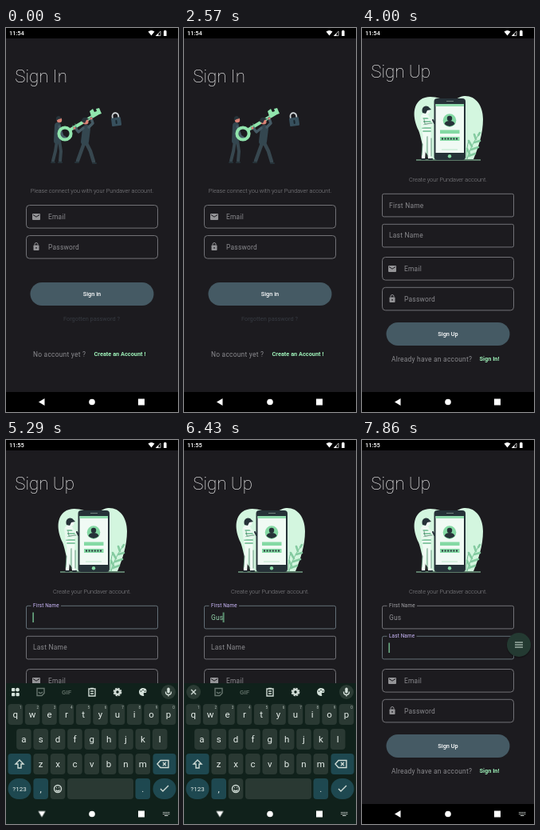
Animation, 216 px wide and 480 px high, one loop 8000 ms. Source, as an HTML page:

```html
<!DOCTYPE html>
<html lang="en">
<head>
<meta charset="utf-8">
<title>Sign up flow</title>
<style>
html, body { margin: 0; width: 100%; height: 100%; overflow: hidden; background: #000; }
svg { display: block; width: 216px; height: 480px; font-family: Roboto, sans-serif; }

.title { font-size: 22.3px; font-weight: 100; fill: #fff; }
.caption { font-size: 7.3px; font-weight: 300; fill: #88888c; text-anchor: middle; }
.body { font-size: 8.4px; letter-spacing: .26px; fill: #8a8a8e; }
.action { font-size: 7.36px; font-weight: 500; fill: #fff; text-anchor: middle; }
.link { font-size: 7.36px; font-weight: 700; fill: #9df0b8; }
.outline { fill: none; stroke: #7c7c80; stroke-width: .9; }
.icon { fill: #949497; }
.line { fill: none; stroke: #d0dbd5; stroke-width: 1.4; }
.key { font-size: 11.5px; fill: #e4ece8; text-anchor: middle; }
.hint { font-size: 4.5px; fill: #b4c0ba; text-anchor: middle; }

/* One percent of the loop is 80 ms. */
.anim { animation: 8s infinite linear; }
.step { animation: 8s infinite step-end; }

#signUp { animation-name: slideIn, fadeIn; }
@keyframes slideIn {
  0%, 32% { transform: translateX(50px); animation-timing-function: cubic-bezier(.3,0,.8,.15); }
  32.94% { transform: translateX(30px); animation-timing-function: cubic-bezier(.05,.7,.1,1); }
  37.6%, 100% { transform: none; }
}
@keyframes fadeIn { 0%, 32.5% { opacity: 0; } 33.6%, 100% { opacity: 1; } }

#early { animation-name: early; }
#late { animation-name: late; }
@keyframes early { 0% { opacity: 1; } 53.5%, 100% { opacity: 0; } }
@keyframes late { 0% { opacity: 0; } 53.5%, 100% { opacity: 1; } }

#firstLabel { transform-origin: 34px 224.5px; animation-name: floatFirst, tintFirst; }
#lastLabel { transform-origin: 34px 262.2px; animation-name: floatLast, tintLast; }
@keyframes floatFirst { 0%, 61.2% { transform: none; } 63.1%, 100% { transform: translateY(-15.5px) scale(.75); } }
@keyframes floatLast { 0%, 92.9% { transform: none; } 94.8%, 100% { transform: translateY(-15.5px) scale(.75); } }
@keyframes tintFirst { 0%, 61.2% { fill: #8a8a8e; } 63.1%, 92.9% { fill: #cfbcff; } 94.8%, 100% { fill: #a5a5a9; } }
@keyframes tintLast { 0%, 92.9% { fill: #8a8a8e; } 94.8%, 100% { fill: #cfbcff; } }
#firstGap { animation-name: gapFirst; }
#lastGap { animation-name: gapLast; }
@keyframes gapFirst { 0%, 61.2% { opacity: 0; } 62.7%, 100% { opacity: 1; } }
@keyframes gapLast { 0%, 92.9% { opacity: 0; } 94.4%, 100% { opacity: 1; } }
#firstBox { animation-name: ringFirst; }
#lastBox { animation-name: ringLast; }
@keyframes ringFirst { 0%, 61.2% { stroke: #7c7c80; } 63.1%, 92.9% { stroke: #6d7a82; } 94.8%, 100% { stroke: #7c7c80; } }
@keyframes ringLast { 0%, 92.9% { stroke: #7c7c80; } 94.8%, 100% { stroke: #6d7a82; } }

#char0 { animation-name: char0; }
#char1 { animation-name: char1; }
#char2 { animation-name: char2; }
@keyframes char0 { 0% { fill-opacity: 0; } 75%, 100% { fill-opacity: 1; } }
@keyframes char1 { 0% { fill-opacity: 0; } 77.5%, 100% { fill-opacity: 1; } }
@keyframes char2 { 0% { fill-opacity: 0; } 80.3%, 100% { fill-opacity: 1; } }
#typed { animation-name: typedTint; }
@keyframes typedTint { 0% { fill: #91cfa9; } 92.9%, 100% { fill: #8e8e92; } }

#firstCaret { animation-name: blinkFirst, caretMove; }
#lastCaret { animation-name: blinkLast; }
@keyframes blinkFirst {
  0% { opacity: 0; } 61.2% { opacity: 1; } 67.5% { opacity: 0; }
  73.8% { opacity: 1; } 86.5%, 100% { opacity: 0; }
}
@keyframes caretMove {
  0% { transform: none; } 75% { transform: translateX(6px); }
  77.5% { transform: translateX(11px); } 80.3%, 100% { transform: translateX(15.5px); }
}
@keyframes blinkLast { 0% { opacity: 0; } 92.9%, 100% { opacity: 1; } }

#keyboard { animation-name: keyboard; }
@keyframes keyboard {
  0%, 62.5% { transform: translateY(151px); animation-timing-function: cubic-bezier(0,0,.2,1); }
  65.5%, 81.7% { transform: none; animation-timing-function: cubic-bezier(.4,0,1,1); }
  84.3%, 100% { transform: translateY(151px); }
}
#menuIcon { animation-name: menu; }
#closeIcon { animation-name: close; }
@keyframes menu { 0% { opacity: 1; } 75%, 100% { opacity: 0; } }
@keyframes close { 0% { opacity: 0; } 75%, 100% { opacity: 1; } }

#navBar { animation-name: navTint; }
@keyframes navTint { 0% { fill: #000; } 62.5% { fill: #10211b; } 84.5%, 100% { fill: #000; } }
#back { transform-origin: 45px 467.5px; animation-name: turn; }
@keyframes turn { 0%, 62.5% { transform: none; } 64.4%, 81.7% { transform: rotate(-90deg); } 83.5%, 100% { transform: none; } }
#imeSwitch { animation-name: imeSwitch; }
@keyframes imeSwitch { 0% { opacity: 0; } 62.5%, 100% { opacity: 1; } }
#fab { transform-origin: 197px 256px; animation-name: pop; }
@keyframes pop {
  0%, 94.6% { opacity: 0; transform: scale(.6); }
  96.4%, 100% { opacity: 1; transform: none; }
}
</style>
</head>
<body>
<svg viewBox="0 0 216 480">
  <defs>
    <g id="mail" class="icon"><rect x="-5" y="-4" width="10" height="8" rx="1"/><path d="M-4-2.5 0 .2 4-2.5" fill="none" stroke="#1c1b1f"/></g>
    <g id="lock" class="icon"><rect x="-3.5" y="-2" width="7" height="6.5" rx=".8"/><path d="M-2-2v-1a2 2 0 0 1 4 0v1" fill="none" stroke="#949497"/><circle cy="1.3" r=".9" fill="#1c1b1f"/></g>
  </defs>

  <rect width="216" height="480" fill="#1c1b1f"/>

  <g id="signIn">
    <text class="title" x="11.3" y="68.3">Sign In</text>

    <g id="carriers" stroke-linecap="round" stroke-linejoin="round" fill="none">
      <path d="M64 141 62 154 59 166M67 141l2 13-1 12" stroke="#37474f" stroke-width="4"/>
      <path d="M57 168h4M66 168h4" stroke="#263238" stroke-width="2"/>
      <path d="M65 122 64 141" stroke="#344750" stroke-width="8"/>
      <path d="M67 123 71 135 76 138" stroke="#455a64" stroke-width="3"/>
      <circle cx="67" cy="115" r="3.2" fill="#d98275"/>
      <path d="M63 116q-1-7 4-6l3 3-4 1z" fill="#263238"/>
      <path d="M98 144 94 155 90 166M101 144l5 10 4 13" stroke="#37474f" stroke-width="4.5"/>
      <path d="M87 168h4M109 169h4" stroke="#263238" stroke-width="2"/>
      <circle cx="74" cy="132" r="7.6" stroke="#91e5ad" stroke-width="4"/>
      <path d="M81 127 118 105" stroke="#91e5ad" stroke-width="4" stroke-linecap="butt"/>
      <path d="M107 110l-2-6 4-3 2 4 3-1-1-3 4-1 3 7z" fill="#91e5ad"/>
      <path d="M84 122l1 5M87 120l2 5" stroke="#67bd8b"/>
      <path d="M101 126 99 142" stroke="#344750" stroke-width="10"/>
      <path d="M97 125 91 130 87 125M104 124l5-5-2-6" stroke="#455a64" stroke-width="3.5"/>
      <circle cx="100" cy="117" r="3.6" fill="#d98275"/>
      <path d="M95 117q0-6 6-5l4 2-4 1-2 4z" fill="#263238"/>
      <circle cx="86" cy="125" r="1.5" fill="#d98275"/>
      <circle cx="107" cy="113" r="1.5" fill="#d98275"/>
      <g transform="rotate(-8 138 117)">
        <path d="M134.5 112v-2a3.8 3.8 0 0 1 7.6 0v2" stroke="#d0d5d8" stroke-width="1.8"/>
        <rect x="132.5" y="112" width="12" height="10.5" rx="1" fill="#37505d"/>
        <path d="M138.5 116v3" stroke="#18242b" stroke-width="2"/>
      </g>
    </g>

    <text class="caption" x="108" y="206.3">Please connect you with your Pundaver account.</text>
    <rect class="outline" x="25.5" y="221.5" width="165" height="28.6" rx="4"/>
    <use href="#mail" x="38" y="236"/><text class="body" x="53" y="239">Email</text>
    <rect class="outline" x="25.5" y="259.5" width="165" height="28.6" rx="4"/>
    <use href="#lock" x="38" y="273.5"/><text class="body" x="53" y="276.5">Password</text>
    <rect x="30.5" y="318" width="155" height="29" rx="14.5" fill="#455a64"/>
    <text class="action" x="108" y="335">Sign in</text>
    <text x="72" y="366" font-size="7.36" fill="#363a41">Forgotten password ?</text>
    <text class="body" x="34" y="411">No account yet ?</text>
    <text class="link" x="110.5" y="410.2">Create an Account !</text>
  </g>

  <g id="signUp" class="anim">
    <rect x="-60" width="336" height="480" fill="#1c1b1f"/>
    <text class="title" x="11.3" y="61.8">Sign Up</text>

    <g id="signUpArt">
      <path d="M110 92C98 88 84 82 73 90C62 99 65 116 71 128C76 140 75 158 90 164H140C146 150 152 132 152 114C152 96 142 84 128 85C120 86 117 91 110 92z" fill="#d3f6df"/>
      <path d="M68 165H149" stroke="#9bdab2"/>
      <g id="plant" fill="none" stroke="#5fae80" stroke-linecap="round">
        <path d="M132 164Q136 148 146 134M131 163Q131 150 134 141" stroke-width=".8"/>
        <path d="M146 134l2-3M143 139l-2-6M141 143l7-2M138 148l-4-7M137 152l9-3M135 157l-3-6M134 160l8-3" stroke="#84cba0" stroke-width="2.6"/>
      </g>
      <g id="reader" fill="none" stroke-linecap="round" stroke-linejoin="round">
        <path d="M79 131 77 162M84 131l1 31" stroke="#f0fbf4" stroke-width="4.5"/>
        <path d="M82 134v27M76 145l-1 14M87 138v22" stroke="#4f846a" stroke-width=".8"/>
        <path d="M75 164h4M84 164h4" stroke="#263238" stroke-width="2"/>
        <path d="M79 112 81 130" stroke="#f0fbf4" stroke-width="11"/>
        <path d="M75 113h10M75 117h11M76 121h10M76 125h10M77 129h9" stroke="#67b88a" stroke-width="1.7"/>
        <path d="M75 112 76 123 87 121M84 112l6 6" stroke="#e7f8ed" stroke-width="3"/>
        <path d="M78 114l1 6 9-1" stroke="#42745c" stroke-width=".7"/>
        <path d="M89 115l2 4" stroke="#263238" stroke-width="2"/>
        <circle cx="82" cy="104" r="3.4" fill="#f3fbf6"/>
        <path d="M76 106c-2-6 2-10 7-8l4 4-5 1-2 4z" fill="#263238"/>
      </g>
      <rect x="90.5" y="88" width="39.5" height="77" rx="4" fill="#263238"/>
      <rect x="92.5" y="95" width="35.5" height="61" fill="#f0faf4"/>
      <rect x="92.5" y="95" width="35.5" height="3" fill="#91dcae"/>
      <path d="M106 91.5h9" stroke="#71817c"/>
      <circle cx="110" cy="115.5" r="8.3" fill="#84d9a4"/>
      <circle cx="110" cy="113" r="3.2" fill="#263238"/>
      <path d="M103.500 120q1-4 6.500-4t6.500 4q-6.500 6-13 0z" fill="#263238"/>
      <rect x="98" y="127.500" width="24.500" height="4.500" fill="#84d9a4"/>
      <rect x="98" y="136" width="24.500" height="5" fill="#84d9a4"/>
      <path d="M100 138.500h21" stroke="#263238" stroke-width="2" stroke-dasharray="2 1.6"/>
      <path d="M100 152h20" stroke="#bde8cd"/>
      <circle cx="110" cy="160.300" r="2.200" fill="#84d9a4"/>
    </g>

    <text class="caption" x="108" y="192.3">Create your Pundaver account.</text>
    <rect id="firstBox" class="outline anim" x="25.5" y="207.3" width="165" height="28.6" rx="2"/>
    <rect id="firstGap" class="anim" x="31.5" y="206" width="37.5" height="3" fill="#1c1b1f"/>
    <text id="firstLabel" class="body anim" x="34" y="224.5">First Name</text>
    <text id="typed" class="body step" x="34" y="224.5"><tspan id="char0" class="step">G</tspan><tspan id="char1" class="step">u</tspan><tspan id="char2" class="step">s</tspan></text>
    <rect id="firstCaret" class="step" x="33.5" y="215.5" width="1.2" height="12.5" fill="#84dda5"/>

    <rect id="lastBox" class="outline anim" x="25.5" y="245.3" width="165" height="28.6" rx="2"/>
    <rect id="lastGap" class="anim" x="31.5" y="244" width="37" height="3" fill="#1c1b1f"/>
    <text id="lastLabel" class="body anim" x="34" y="262.2">Last Name</text>
    <rect id="lastCaret" class="step" x="33.5" y="253.5" width="1.2" height="12.5" fill="#84dda5"/>

    <rect class="outline" x="25.5" y="286.5" width="165" height="28.6" rx="4"/>
    <use href="#mail" x="38" y="301"/><text class="body" x="53" y="303.8">Email</text>
    <rect class="outline" x="25.5" y="324.3" width="165" height="28.6" rx="4"/>
    <use href="#lock" x="38" y="338.5"/><text class="body" x="53" y="341.5">Password</text>
    <rect x="30.5" y="368" width="155" height="29" rx="14.5" fill="#455a64"/>
    <text class="action" x="108" y="385.2">Sign Up</text>
    <text class="body" x="37" y="416.8">Already have an account?</text>
    <text class="link" x="147.5" y="416.3">Sign In!</text>
  </g>

  <rect width="216" height="13"/>
  <g fill="#fff" font-size="7.36" font-weight="500">
    <text id="early" class="step" x="4" y="9.3">11:54</text>
    <text id="late" class="step" x="4" y="9.3">11:55</text>
    <path d="M178.5 4.5q4-3 8 0l-4 5zM191.500 6.500v3.500h-3.500zM198 3.500h1v-.8h1.600v.8h1v6.500h-3.600z"/>
    <path d="M188.500 9.600l5.500-5.500v5.500z" fill="none" stroke="#fff" stroke-width=".7"/>
  </g>

  <g id="keyboard" class="anim">
    <rect y="304" width="216" height="176" fill="#10211b"/>
    <g id="menuIcon" class="step" fill="#d5e2db">
      <rect x="7" y="310" width="4.3" height="4.3" rx="1"/><circle cx="14.5" cy="312.2" r="2.4"/>
      <rect x="7" y="316" width="4.3" height="4.3" rx="1"/><rect x="12.5" y="316" width="4.3" height="4.3" rx="1"/>
    </g>
    <g id="closeIcon" class="step">
      <circle cx="12" cy="315" r="9" fill="#2b3b34"/><path class="line" d="M9 312l6 6m0-6-6 6"/>
    </g>
    <path class="line" opacity=".45" d="M39 310.5h9v6l-3 3h-6zM41 315q2 3 5 0"/>
    <text x="76" y="318" font-size="8" font-weight="500" text-anchor="middle" fill="#66756d">GIF</text>
    <path class="line" d="M104 311h8v9h-8zM106 310.5h4M106 314h4M106 317h4"/>
    <circle class="line" cx="140" cy="315" r="3" style="stroke-width:2.6"/>
    <circle class="line" cx="140" cy="315" r="4.7" stroke-dasharray="2.4 1.29"/>
    <path d="M172 310a5 5 0 1 0 0 10q2 0 1-2t1-2h2q2-6-4-6z" fill="#d5e2db"/>
    <path d="M169.5 314h.1M172 312.5h.1M174.5 314h.1" stroke="#10211b" stroke-width="1.5" stroke-linecap="round"/>
    <circle cx="204" cy="315" r="9" fill="#2b3b34"/>
    <rect x="202.3" y="309.5" width="3.4" height="7" rx="1.7" fill="#d5e2db"/>
    <path class="line" d="M200.5 314.5q0 4 3.5 4t3.5-4M204 318.5v2"/>
    <g id="keys"></g>
    <path class="line" d="M17 400l5 5h-3v5h-4v-5h-3zM194 400.5h10v9h-10l-4-4.5zM197 403l4 4m0-4-4 4M194 436l3 3 7-7"/>
    <circle class="line" cx="65" cy="436" r="4.5"/>
    <path class="line" d="M63 434.5h.8M66.3 434.5h.8M62.5 437.5q2.5 2.5 5 0"/>
  </g>

  <rect id="navBar" class="step" y="455" width="216" height="25"/>
  <g fill="#fff">
    <path id="back" class="anim" d="M41 467.5l7.500-4.400v8.800z"/>
    <circle cx="108" cy="467.5" r="3.8"/>
    <rect x="166" y="463.5" width="8" height="8"/>
    <g id="imeSwitch" class="step" stroke="#d0d6d3">
      <path d="M197 465.500h8.500M197 467.500h8.500" stroke-dasharray="1.200 .6"/>
      <path d="M199 469.500h4.500"/>
    </g>
  </g>

  <g id="fab" class="anim">
    <circle cx="197" cy="257" r="15.5" fill="#000" opacity=".25"/>
    <circle cx="197" cy="256" r="15" fill="#243a32"/>
    <path d="M192 253h10M192 256h10M192 259h10" stroke="#d5e6dc" stroke-width="1.2"/>
  </g>
</svg>
<script>
const PITCH = 21.35;
const keys = document.getElementById('keys');

function add(name, attrs, text = '') {
  const node = document.createElementNS('http://www.w3.org/2000/svg', name);
  for (const [key, value] of Object.entries(attrs)) node.setAttribute(key, value);
  node.textContent = text;
  keys.append(node);
}

function cap(x, y, width, label = '', { fill = '#2a3933', rx = 4, size = 11.5 } = {}) {
  add('rect', { x: x - width / 2, y: y - 13, width, height: 26, rx, fill });
  add('text', { x, y: y + size / 3, class: 'key', style: `font-size:${size}px` }, label);
}

function row(letters, firstX, y, hints = '') {
  [...letters].forEach((letter, i) => {
    const x = firstX + i * PITCH;
    cap(x, y, 18.6, letter);
    if (hints) add('text', { x: x + 6.5, y: y - 7, class: 'hint' }, hints[i]);
  });
}

const teal = { fill: '#1e4850' };
row('qwertyuiop', 11.8, 343, '1234567890');
row('asdfghjkl', 22.4, 374);
row('zxcvbnm', 43.7, 405);
cap(17, 405, 29, '', teal);
cap(199, 405, 29, '', teal);
cap(17, 436, 29, '?123', { ...teal, rx: 13, size: 8 });
cap(43.7, 436, 18.6, ',', teal);
cap(65, 436, 18.6);
cap(118.5, 436, 83);
cap(171.8, 436, 18.6, '.', teal);
cap(199, 436, 29, '', { ...teal, rx: 13 });
</script>
</body>
</html>
```
